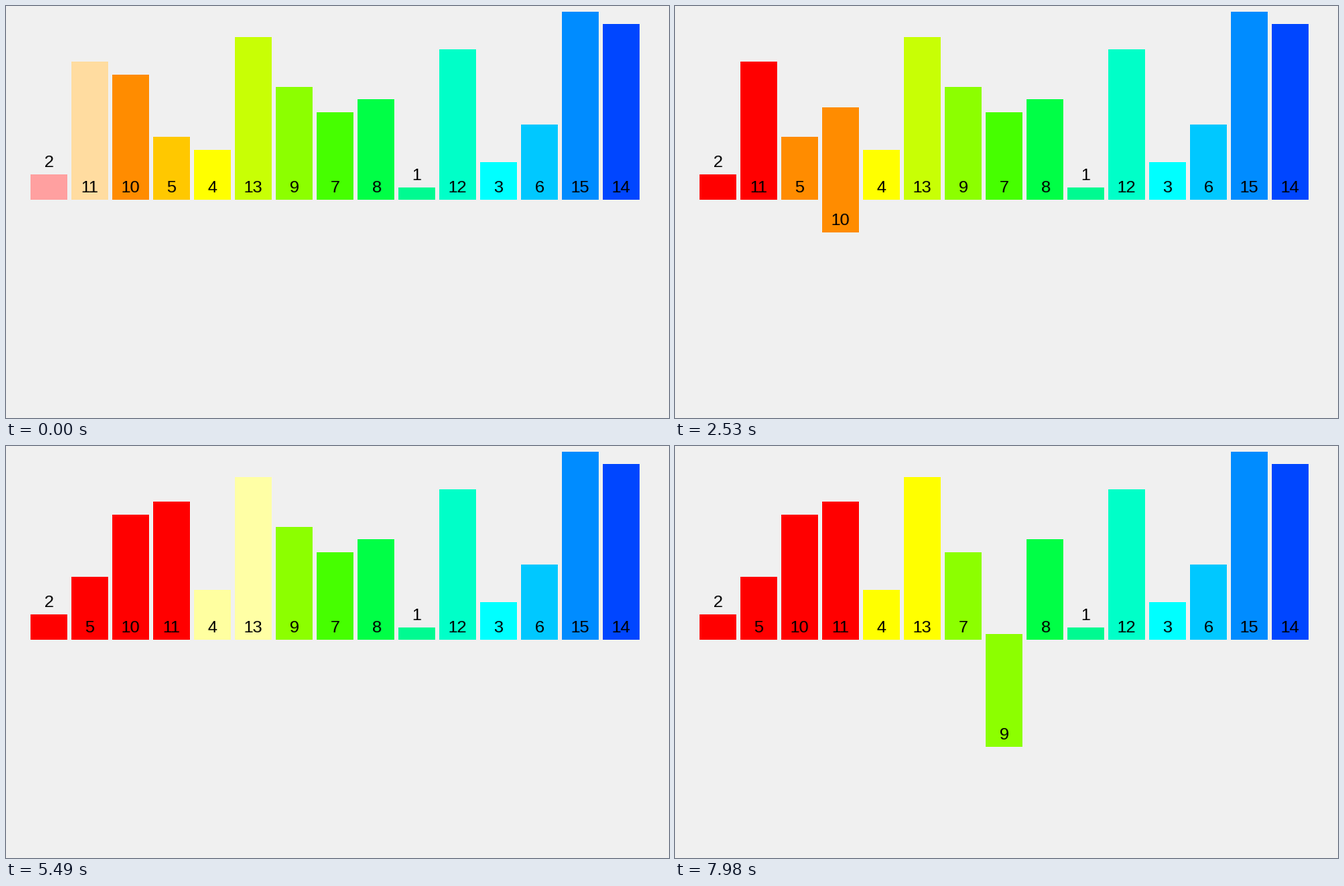
A matplotlib script that plays this animation: 811x504 px, repeating every 8 s.

```python
import numpy as np
import matplotlib.pyplot as plt
from matplotlib.animation import FuncAnimation
from matplotlib.patches import Rectangle

W, H, DPI = 811, 504, 64
LOOP_MS, TICK_MS = 8000, 20

VALUES = [2, 11, 10, 5, 4, 13, 9, 7, 8, 1, 12, 3, 6, 15, 14]
HUES = ["#ff0000", "#ff3c00", "#ff8c00", "#ffc800", "#ffff00",
        "#c8ff05", "#8cff00", "#46ff00", "#00ff46", "#00fa91",
        "#00ffc8", "#00ffff", "#00c8ff", "#008cff", "#0046ff"]

BAR_W, PITCH, LEFT, UNIT = 45, 50, 30, 230 / 15
TOP_ROW, LOW_ROW = 237, 497

# Durations are counted in picture steps of roughly 148 ms.
LOOK, STEP, GLIDE = 0.384, 2.208, 1.546
MERGES = [(0, 1, 2, -0.46), (2, 3, 4, 8.97), (0, 2, 4, 18.19),
          (4, 5, 6, 37.0), (6, 7, 8, 46.22)]
CLOCK_MS = [0, 1200, 2380, 3430, 4610, 5790, 6960, 7980]
CLOCK_STEP = [0, 8, 16, 23, 31, 39, 47, 54]


def rgb(code):
    return np.array([int(code[i:i + 2], 16) for i in (1, 3, 5)]) / 255


def pale(color):
    return np.minimum(1, color + 160 / 255)


def ease(u):
    u = np.clip(u, 0, 1)
    return 4 * u ** 3 if u < 0.5 else 1 - 4 * (1 - u) ** 3


def slot_x(i):
    return LEFT + PITCH * i


class Bar:
    def __init__(self, value, slot, color):
        self.value, self.color, self.lit = value, color, False
        self.home = (np.array([slot_x(slot), TOP_ROW], float), color)
        self.events = []

    def light(self, t):
        if not self.lit:
            self.lit = True
            self.events.append((t, 0, None, pale(self.color)))

    def move(self, t, slot, row, color):
        self.lit, self.color = False, color
        spot = np.array([slot_x(slot), row], float)
        self.events.append((t, GLIDE, spot, color))

    def pose(self, t):
        pos, color = self.home
        for start, span, spot, tone in self.events:
            if t < start:
                break
            p = ease((t - start) / span) if span else 1
            if spot is not None:
                pos = pos + (spot - pos) * p
            color = color + (tone - color) * p
        return pos, color


def plan_merge(row, lo, mid, hi, t):
    left, right, merged = row[lo:mid], row[mid:hi], []
    tone = left[0].color
    for bar in (left[0], right[0]):
        bar.light(t - 0.25)
    while left or right:
        if left and right:
            left[0].light(t)
            right[0].light(t)
            t += LOOK
            side = left if left[0].value <= right[0].value else right
        else:
            side = left or right
        bar = side.pop(0)
        bar.light(t)
        bar.move(t, lo + len(merged), LOW_ROW, tone)
        merged.append(bar)
        t += STEP
    for i, bar in enumerate(merged):
        bar.move(t, lo + i, TOP_ROW, tone)
        t += STEP
    row[lo:hi] = merged


bars = [Bar(v, i, rgb(c)) for i, (v, c) in enumerate(zip(VALUES, HUES))]
order = bars[:]
for lo, mid, hi, start in MERGES:
    plan_merge(order, lo, mid, hi, start)

fig = plt.figure(figsize=(W / DPI, H / DPI), dpi=DPI, facecolor="#f0f0f0")
ax = fig.add_axes([0, 0, 1, 1])
ax.set(xlim=(0, W), ylim=(H, 0))
ax.axis("off")

boxes, labels = [], []
for bar in bars:
    boxes.append(ax.add_patch(Rectangle((0, 0), BAR_W, -bar.value * UNIT, lw=0)))
    labels.append(ax.text(0, 0, str(bar.value), family="Liberation Sans",
                          size=21 * 72 / DPI, color="black",
                          ha="center", va="baseline", zorder=3))


def draw(n):
    ms = n * TICK_MS + TICK_MS / 2
    t = int(np.interp(ms, CLOCK_MS, CLOCK_STEP) + 0.1)
    for bar, box, label in zip(bars, boxes, labels):
        (x, y), color = bar.pose(t)
        box.set_xy((x, y))
        box.set_facecolor(color)
        lift = bar.value * UNIT if bar.value <= 2 else 0
        label.set_position((x + BAR_W / 2, y - lift - 9))
    return boxes + labels


def reset():
    return draw(0)


anim = FuncAnimation(fig, draw, frames=LOOP_MS // TICK_MS, interval=TICK_MS,
                     init_func=reset, repeat=True, repeat_delay=0)
plt.show()
```
